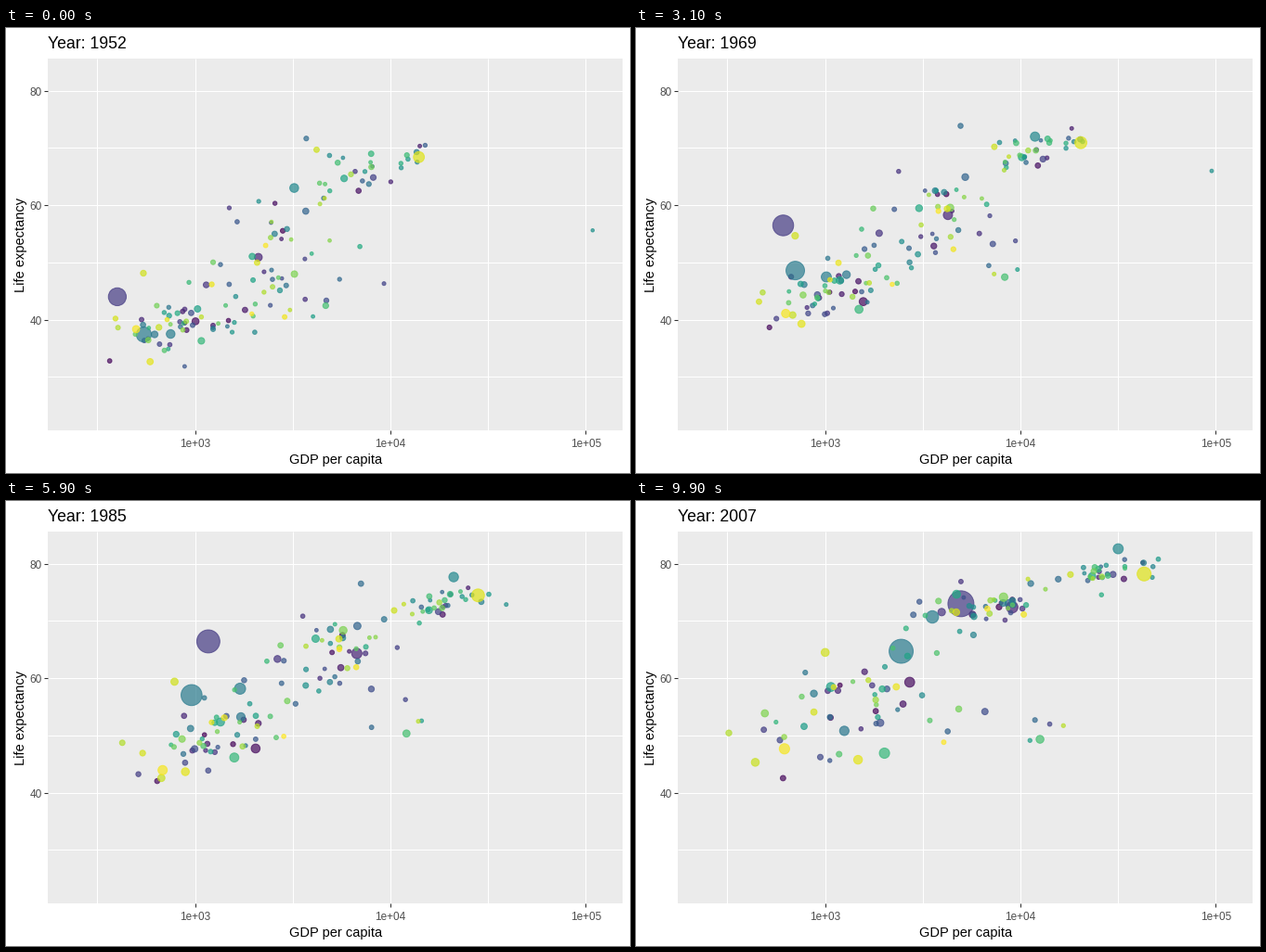
These frames come from a looping animation (672x480 px, 10000 ms). A matplotlib script:

```python
import numpy as np
import matplotlib.pyplot as plt
from matplotlib.animation import FuncAnimation
from matplotlib.patches import Rectangle

W, H, DPI = 672, 480, 96
PX = 72 / DPI  # points per pixel
FRAMES = 100
FIRST, LAST = 1952, 2007
COUNT = 142
LEFT, RIGHT, TOP, BOTTOM = 45, 664, 33, 434
STEPS = np.linspace(0, 1, 12)  # one knot every five years

plt.rcParams["font.family"] = "Liberation Sans"
rng = np.random.default_rng(52)


def x_pos(log_gdp):
    return 203.6 + 210.4 * (log_gdp - 3)


def y_pos(life):
    return 67.6 + 6.175 * (80 - life)


def spread(keys):
    """Sample evenly spaced key values at every knot."""
    return np.interp(STEPS, np.linspace(0, 1, len(keys)), keys)


# ---- leading bubbles: colour rank -> population, log GDP and life by knot
tracks = {}


def lead(rank, pops, gdp, life):
    tracks[rank] = spread(pops), spread(np.log10(gdp)), spread(life)


lead(25, (556, 1319), (400, 513, 698, 1170, 2160, 4959),
     (44, 47.3, 63.5, 66.4, 70.1, 73))
lead(59, (372, 1110), (547, 712, 1040, 2452), (37.4, 49.4, 59.1, 64.7))
lead(135, (158, 301), (13990, 20900, 30400, 42952), (68.4, 71, 75.4, 78.2))
lead(60, (82, 224), (750, 1020, 1950, 3541), (37.5, 48, 60.9, 70.7))
lead(15, (57, 190), (2109, 4500, 7500, 9066), (50.9, 58.8, 65.8, 72.4))
lead(67, (86, 127), (3217, 13400, 23800, 31656), (63, 72.7, 79, 82.6))
lead(95, (33, 135), (1077, 1545, 1600, 2014), (36.3, 42.2, 47.2, 46.9))
lead(72, (0.2, 2.5), (108382, 99000, 30500, 47307), (55.6, 66.8, 74.5, 77.6))

# ---- everything else: seeded paths around the trend of four groups
# share, log GDP and its spread, life and its spread (early, middle, late), growth
GROUPS = [
    (0.40, (2.95, 3.07, 3.10), (0.22, 0.20, 0.26), (39.5, 48.5, 55), (4, 4.5, 6), 3),
    (0.28, (3.42, 3.70, 3.86), (0.20, 0.18, 0.17), (51, 63, 72.5), (7, 5, 2), 2.4),
    (0.26, (3.86, 4.20, 4.43), (0.17, 0.12, 0.12), (66.5, 72, 78.5), (3, 1.6, 1.4), 1.3),
    (0.06, (3.30, 3.80, 3.85), (0.25, 0.25, 0.22), (40, 53, 51), (4, 4, 4), 3),
]
SHARES = [group[0] for group in GROUPS]


def follow(rank):
    _, gdp, gdp_sd, life, life_sd, growth = GROUPS[rng.choice(4, p=SHARES)]
    wealth = 0.85 * rng.normal() + 0.45 * rng.normal(size=3)
    health = 0.75 * rng.normal() + 0.45 * rng.normal(size=3) + 0.45 * wealth
    pop = np.clip(np.exp(rng.normal(1.5, 1.1)), 0.2, 45)
    tracks[rank] = (
        spread((pop, pop * growth)),
        spread(np.add(gdp, gdp_sd * wealth)) + rng.normal(0, 0.02, 12),
        spread(np.add(life, life_sd * health)) + rng.normal(0, 0.35, 12),
    )


for rank in range(1, COUNT + 1):
    if rank not in tracks:
        follow(rank)

knots = np.array([tracks[rank] for rank in range(1, COUNT + 1)])


def state(t):
    """Pixel offsets and marker areas of all bubbles at loop share t."""
    pos = t * (len(STEPS) - 1)
    k = min(int(pos), len(STEPS) - 2)
    now = knots[:, :, k] + (knots[:, :, k + 1] - knots[:, :, k]) * (pos - k)
    pop, gdp, life = now.T
    diameter = 3.2 + 24.8 * np.sqrt(pop / 1319)
    return np.column_stack((x_pos(gdp), y_pos(life))), (diameter * PX) ** 2


# ---- static chart
fig = plt.figure(figsize=(W / DPI, H / DPI), dpi=DPI, facecolor="white")
ax = fig.add_axes([0, 0, 1, 1])
ax.set_xlim(0, W)
ax.set_ylim(H, 0)
ax.axis("off")
ax.add_patch(Rectangle((LEFT, TOP), RIGHT - LEFT, BOTTOM - TOP,
                       facecolor="#EBEBEB", linewidth=0, zorder=0))


def line(xs, ys, color):
    ax.plot(xs, ys, color=color, linewidth=1.07 * PX, zorder=1,
            solid_capstyle="butt")


def label(x, y, text, size, color="black", **kw):
    return ax.text(x, y, text, fontsize=size, color=color, **kw)


GREY, TICK = "#4D4D4D", "#333333"
for power in np.arange(2.5, 5.1, 0.5):
    x = x_pos(power)
    line((x, x), (TOP, BOTTOM), "white")
    if power in (3, 4, 5):
        line((x, x), (BOTTOM, BOTTOM + 3.7), TICK)
        label(x, 452, f"1e+{int(power):02d}", 8.8, GREY, ha="center")
for life in range(30, 81, 10):
    y = y_pos(life)
    line((LEFT, RIGHT), (y, y), "white")
    if life in (40, 60, 80):
        line((LEFT - 3.7, LEFT), (y, y), TICK)
        label(39, y + 5, str(life), 8.8, GREY, ha="right")

label(355, 470, "GDP per capita", 11, ha="center")
label(16.5, 234, "Life expectancy", 11, ha="center", va="center", rotation=90)
title = label(LEFT, 22, "", 13.2)

colors = plt.get_cmap("viridis")(np.linspace(0, 1, COUNT))
colors[:, 3] = 0.7
xy, area = state(0)
dots = ax.scatter(xy[:, 0], xy[:, 1], s=area, facecolors=colors,
                  edgecolors=colors, linewidths=PX, zorder=3)


def draw(i):
    t = i / (FRAMES - 1)
    xy, area = state(t)
    dots.set_offsets(xy)
    dots.set_sizes(area, DPI)
    title.set_text(f"Year: {round(FIRST + (LAST - FIRST) * t)}")
    return dots, title


anim = FuncAnimation(fig, draw, frames=FRAMES, interval=100,
                     repeat=True, repeat_delay=0)
plt.show()
```
